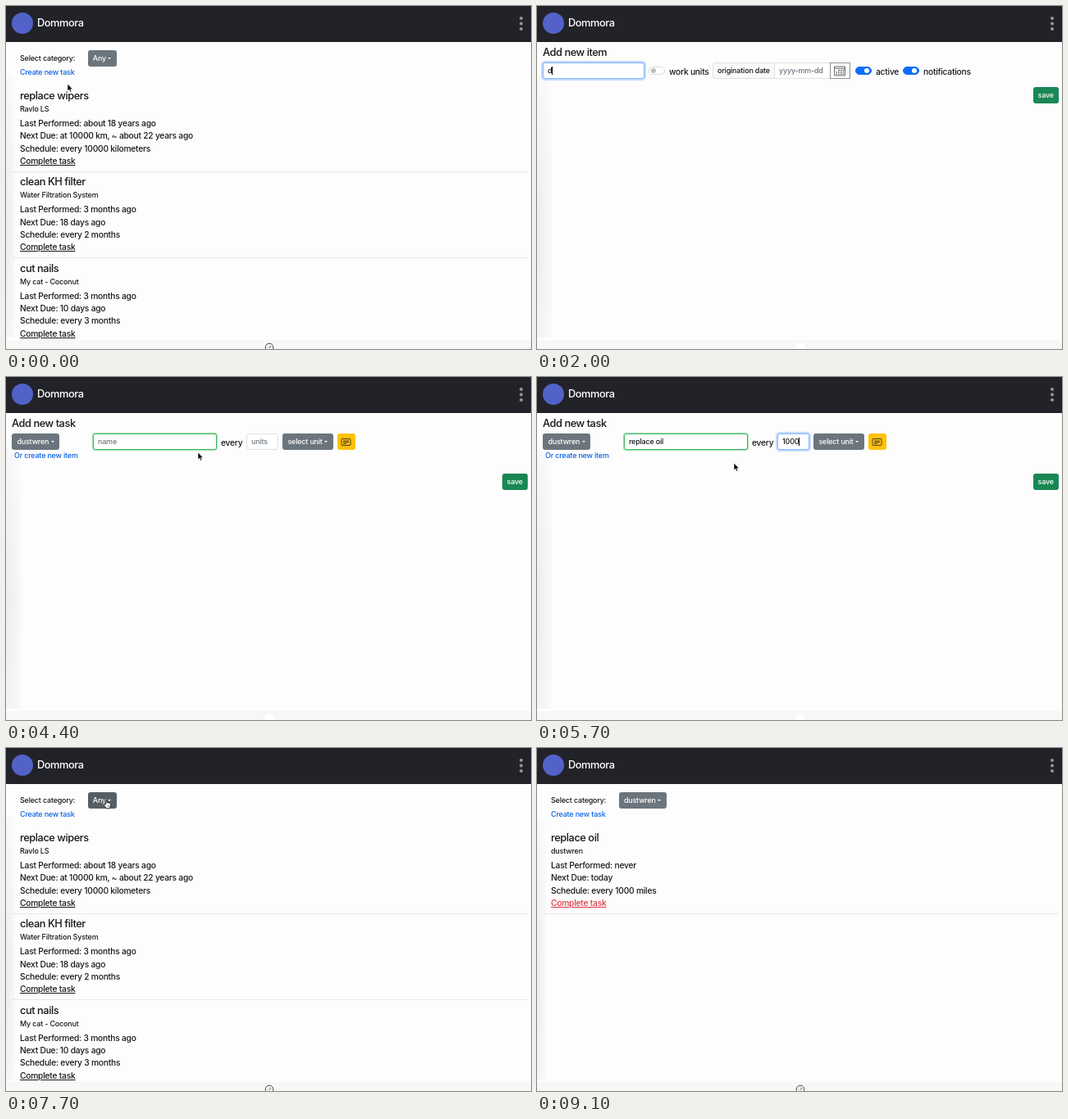
An HTML page that plays this animation: 640x419 px, repeating every 9720 ms.

```html
<!DOCTYPE html>
<html lang="en">
<head>
<meta charset="utf-8">
<title>Task planner demo</title>
<style>
html, body { margin: 0; width: 100%; height: 100%; overflow: hidden; background: #fdfdfd; }
#stage { position: absolute; left: 0; top: 0; width: 640px; height: 419px; overflow: hidden;
  font: 450 8.96px/16px Inter, sans-serif; letter-spacing: -.02em; color: #15181b; }
#stage * { position: absolute; box-sizing: border-box; white-space: pre; }
#stage .flow, #stage .flow * { position: static; }
.body { font-size: 10.24px; letter-spacing: -.022em; }
.title { font-size: 12.8px; font-weight: 500; letter-spacing: -.035em; }
.link { color: #0a62e6; }
.under { text-decoration: underline; }
.red { color: #dc3545; }
.white { color: #fff; }
.muted { color: #6c757d; }
.button { display: flex; align-items: center; justify-content: center; height: 20px; border-radius: 3px; color: #fff; }
.button i { position: static !important; margin-left: 2.3px; border: 2.7px solid transparent; border-top-color: #fff; border-bottom: 0; }
.input { height: 20px; border: 1px solid #dee2e6; border-radius: 3px; background: #fff; padding-left: 5px; line-height: 18px; }
.green { border-color: #43b563; box-shadow: 0 0 1px 1px #9be0ae; }
.blue { border-color: #86b7fe; box-shadow: 0 0 0 2px #c2dbfe; }
.caret { position: static !important; display: inline-block; width: 1px; height: 10px; background: #000; vertical-align: -2px; }
.menu { background: #fff; border: 1px solid #d4d4d5; border-radius: 4px; }
.toggle { height: 10px; border-radius: 5px; border: 1px solid #d6d8da; background: #fff; }
.toggle b { width: 6px; height: 6px; border-radius: 3px; top: 1px; left: 2px; background: #bfbfbf; }
.toggle.on { background: #0d6efd; border-color: #0d6efd; }
.toggle.on b { left: auto; right: 2px; background: #fff; }
svg { overflow: visible; fill: none; }
</style>
</head>
<body>
<div id="stage"></div>
<script>
const LOOP = 9720;
const ITEM = "dustwren";
const CAR = "Ravlo LS";
const ITEMS = [CAR, "PacerHollow R4.0 treadmill", "Plumbay lagoona inflatable hot tub K200307/K200407",
  "House", "HVAC", "Reel mower", "My cat - Coconut", "Water Filtration System"];
const UNITS = ["miles", "kilometers", "days", "months", "years"];
const TASKS = [
  ["replace wipers", CAR, "about 18 years ago", "at 10000 km, ~ about 22 years ago", "10000 kilometers"],
  ["clean KH filter", "Water Filtration System", "3 months ago", "18 days ago", "2 months"],
  ["cut nails", "My cat - Coconut", "3 months ago", "10 days ago", "3 months"],
];
const NEW_TASK = ["replace oil", ITEM, "never", "today", "1000 miles"];
const GRAY = "#6c757d", DARK_GRAY = "#565e64", GREEN = "#198754", DARK_GREEN = "#146c43";

// Pointer path: time, x, y, and the shape used from that time on.
const POINTER = [
  [0, 75, 95, "arrow"], [300, 73, 79, "hand"], [500, 72, 80, "arrow"], [800, 65, 84, "arrow"],
  [1000, 64, 86, "arrow"], [1400, 48, 93, "hand"], [1700, 48, 93, "arrow"], [2000, 48, 93, ""],
  [2800, 52, 90, "arrow"], [3200, 210, 42, "arrow"], [3700, 593, 105, "arrow"], [3800, 615, 107, "hand"],
  [3900, 600, 107, "arrow"], [4400, 234, 92, "arrow"], [4500, 234, 92, ""],
  [5700, 240, 105, "arrow"], [5900, 285, 136, "arrow"], [6200, 366, 80, "hand"], [6500, 365, 103, "hand"],
  [6700, 365, 103, "hand"], [6800, 390, 106, "arrow"], [7200, 619, 125, "hand"], [7300, 590, 122, "arrow"],
  [7700, 122, 63, "hand"], [7900, 122, 66, "arrow"], [8100, 135, 110, "hand"], [8300, 135, 110, "hand"],
  [8600, 160, 268, "hand"], [8700, 160, 268, "arrow"], [8900, 160, 268, "arrow"], [9000, 594, 52, "arrow"], [9100, 594, 52, ""],
];
const SHAPES = {
  arrow: '<path d="M0 0V9L2 7.2 3.4 10.3 5 9.6 3.6 6.7H6.4Z" fill="#000" stroke="#fff" stroke-width=".7"/>',
  hand: '<path d="M-.7.8c0-1.1 1.5-1.1 1.5 0V4c1.4-.5 5 .2 5 1.7 0 2-.4 2.7-1 3.7v1.4H.3C-.6 9.2-2 7.5-2.7 6.4c-.5-.9.6-1.5 1.2-.8l.8.9z" fill="#fff" stroke="#222" stroke-width=".9"/><path d="M2.4 6.8v2.2M4 6.8v2.2" stroke="#222" stroke-width=".5"/>',
};

const within = (t, from, to) => t >= from && t < to;
const box = (x, y, w, h, css = "", cls = "", inner = "") =>
  `<div class="${cls}" style="left:${x}px;top:${y}px;width:${w}px;height:${h}px;${css}">${inner}</div>`;
const text = (x, middle, str, cls = "") =>
  `<div class="${cls}" style="left:${x}px;top:${middle - 8}px">${str}</div>`;
const button = (x, y, w, label, color) => box(x, y, w, 20, `background:${color}`, "button", label);
const dropdown = (x, y, w, label, dark) => button(x, y, w, label + "<i></i>", dark ? DARK_GRAY : GRAY);
const input = (x, w, value, placeholder, cls, caret) => box(x, 69, w, 20, "", "input " + cls,
  `<span class="flow">${value}${caret ? '<i class="caret"></i>' : ""}${value ? "" : `<span class="muted">${placeholder}</span>`}</span>`);
const toggle = (x, on) => box(x, 74, 20, 10, "", "toggle" + (on ? " on" : ""), "<b></b>");
const svg = (x, y, inner) => `<svg width="1" height="1" style="left:${x}px;top:${y}px">${inner}</svg>`;
const menu = (x, y, w, labels, active = -1) => box(x, y, w, labels.length * 20.5 + 10, "", "menu",
  labels.map((label, i) => (i === active ? box(0, 4 + i * 20.5, w - 2, 20.5, "background:#e9ecef") : "") +
    text(10, 14.3 + i * 20.5, label, "body")).join(""));

// Counts hold the number of typed characters, one entry per 100 ms.
function typed(word, t, start, counts) {
  if (t < start) return "";
  return word.slice(0, counts[Math.min(Math.floor((t - start) / 100), counts.length - 1)]);
}

function taskRow([name, item, performed, due, schedule], i, red) {
  const y = i * 105.4;
  return text(17, y + 110, name, "title") + text(17, y + 126, item) +
    text(17, y + 143, "Last Performed: " + performed, "body") +
    text(17, y + 158.3, "Next Due: " + due, "body") +
    text(17, y + 173.6, "Schedule: every " + schedule, "body") +
    text(17, y + 188.9, "Complete task", "body under" + (red ? " red" : "")) +
    (i < 2 ? box(8, Math.round(y + 202), 628, 1, "background:#e5e6e8") : "");
}

function listPage(t) {
  const filtered = t >= 8700;
  const open = within(t, 7800, 8700);
  const rows = filtered ? taskRow(NEW_TASK, 0, true) : TASKS.map((task, i) => taskRow(task, i)).join("");
  return text(17, 64, "Select category:") + text(17, 80.5, "Create new task", "link") + rows +
    dropdown(99.5, 53.5, filtered ? 58 : 35, filtered ? ITEM : "Any", within(t, 7700, 8700)) +
    (open ? menu(100, 75, 267, ["Any", ...ITEMS, ITEM], t >= 8600 ? 9 : t >= 8100 ? 1 : -1) : "");
}

function taskPage(t) {
  const second = t >= 3900;
  const dx = second ? -10 : 0;
  const name = typed("replace oil", t, 4500, [2, 4, 5, 6, 7, 9, 11]);
  const amount = typed("1000", t, 5300, [0, 2, 3, 4]);
  const unitsFocus = within(t, 5300, 6300);
  return text(7, 56.5, "Add new task", "title") +
    text(10, 96, "Or create new item", "link") +
    dropdown(7, 69, second ? 58 : 94, second ? ITEM : "please select item", within(t, 700, 1200)) +
    input(116 + dx, 151, name, "name", "green", within(t, 4500, 5300)) +
    text(272 + dx, 79.5, "every", "body") +
    input(303 + dx, 39, amount, "units", unitsFocus ? "blue" : "", unitsFocus) +
    dropdown(347 + dx, 69, 61.5, t >= 6600 ? "miles" : "select unit", within(t, 6200, 6600)) +
    button(413.5 + dx, 69, 22, "", "#ffc107") +
    svg(419 + dx, 75, '<path d="M1 .5H10Q11 .5 11 1.5V7.5Q11 8.5 10 8.5H1Q0 8.5 0 7.5V1.5Q0 .5 1 .5ZM2 3H9M2 4.7H9M2 6.4H6" stroke="#212529" stroke-width=".8"/>') +
    button(605, 118, 30.5, "save", within(t, 7100, 7300) ? DARK_GREEN : GREEN) +
    (within(t, 800, 1100) ? menu(7, 90.5, 268, ITEMS) : "") +
    (within(t, 6300, 6600) ? menu(337, 90.5, 102, UNITS, t >= 6400 ? 0 : -1) : "");
}

function itemPage(t) {
  const focus = t < 3700;
  const calendarDots = [0, 1, 2].map(i => `M${2.5 + (i ? 0 : 3)} ${5.5 + i * 2.3}H12.5`).join("");
  return text(7, 56.5, "Add new item", "title") +
    input(7, 124, typed(ITEM, t, 2000, [1, 2, 3, 4, 4, 6, 8]), "name of item", focus ? "blue" : "", focus) +
    toggle(136, false) + text(161, 79.5, "work units", "body") +
    box(214, 69, 76, 20, "background:#f8f9fa;border-radius:3px 0 0 3px", "input", "origination date") +
    box(289, 69, 69, 20, "border-radius:0", "input muted", "yyyy-mm-dd") +
    box(356.5, 69, 25.5, 20, "border-color:#8a9096;border-radius:0", "input") +
    svg(362, 73, `<path d="M.5 1H13.5V12H.5ZM.5 3.2H13.5" stroke="#444" stroke-width=".8"/><path d="${calendarDots}" stroke="#444" stroke-width="1.3" stroke-dasharray="1.5 1.2"/>`) +
    toggle(387.5, true) + text(413, 79.5, "active", "body") +
    toggle(446, true) + text(471, 79.5, "notifications", "body") +
    button(605, 99, 30.5, "save", t >= 3800 ? DARK_GREEN : GREEN);
}

function pointer(t) {
  const i = POINTER.findLastIndex(point => point[0] <= t);
  const [t0, x0, y0, shape] = POINTER[i];
  if (!shape) return "";
  const [t1, x1, y1] = POINTER[i + 1];
  const k = (t - t0) / (t1 - t0);
  return svg(x0 + (x1 - x0) * k, y0 + (y1 - y0) * k, SHAPES[shape]);
}

function frame(t) {
  const onList = t < 500 || t >= 7300;
  const page = onList ? listPage(t) : within(t, 1700, 3900) ? itemPage(t) : taskPage(t);
  const gauge = onList
    ? '<circle r="4.8" fill="#fff" stroke="#333" stroke-width=".9"/><path d="M-.5 1L2.3-2M-3 0H-2.4M0-3V-2.5" stroke="#333" stroke-width=".9"/>'
    : '<circle r="6" fill="#fff"/>';
  return box(0, 85, onList ? 11 : 18, 320, "background:radial-gradient(ellipse at 0 60%,#ececec,#fdfdfd00 100%)") +
    box(0, 408, 640, 11, "background:#f7f7f8") + svg(321, 417, gauge) +
    box(0, 0, 640, 44, "background:#222329") +
    svg(20, 20.5, '<circle r="13" fill="#5262c8"/>') +
    text(38, 20.5, "Dommora", "title white") +
    svg(628, 15, [0, 6.5, 13].map(y => `<circle cy="${y}" r="2" fill="#96979b"/>`).join("")) +
    page + pointer(t);
}

const stage = document.getElementById("stage");
const start = performance.now();
let shown = -1;
function tick() {
  const elapsed = Math.max(0, performance.now() - start) % LOOP;
  const t = Math.floor(elapsed / 100) * 100;
  if (t !== shown) stage.innerHTML = frame(shown = t);
  requestAnimationFrame(tick);
}
tick();
</script>
</body>
</html>
```
